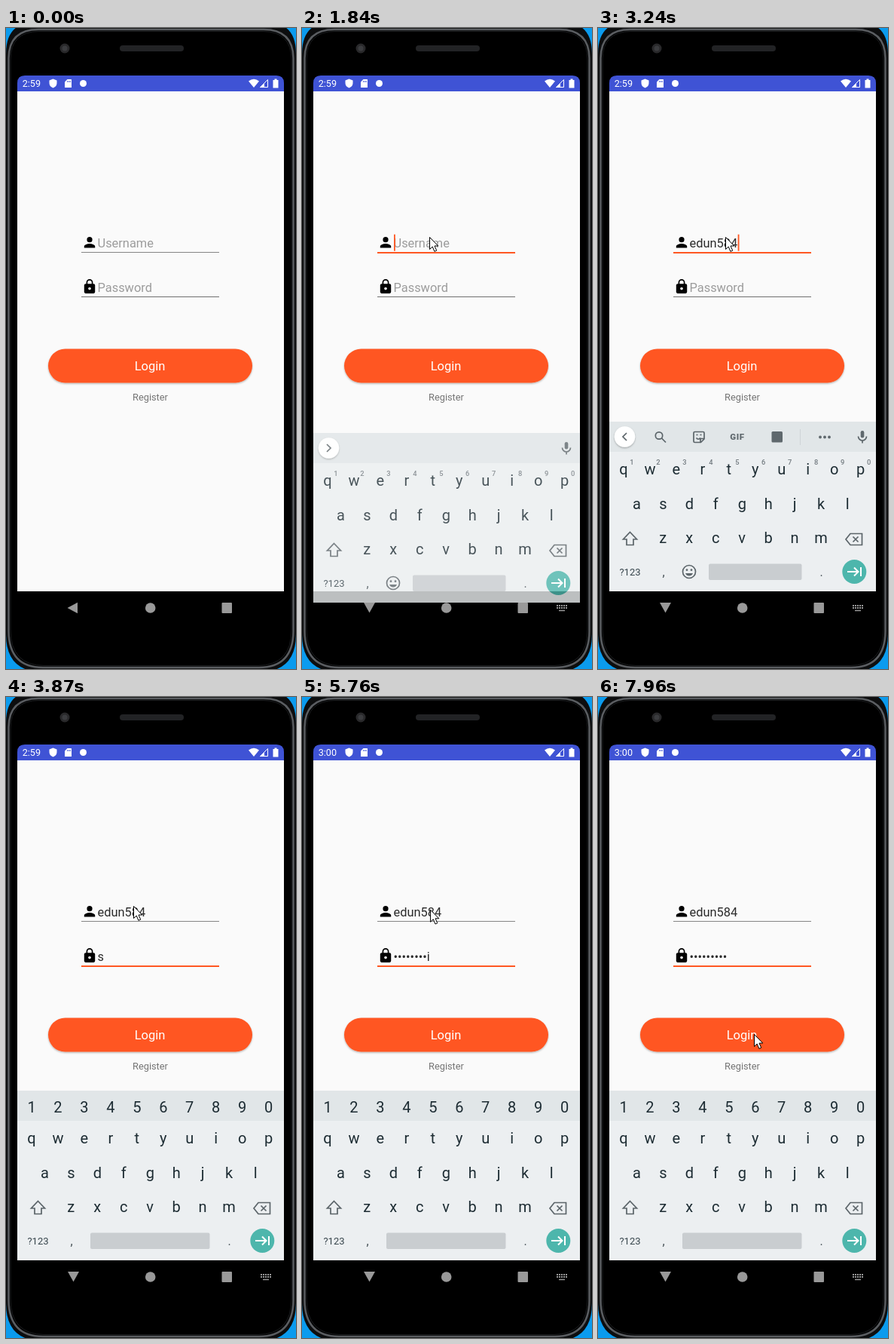
Animation, 385 px wide and 850 px high, one loop 8000 ms. Source, as an HTML page:

```html
<!DOCTYPE html>
<html lang="en">
<head>
<meta charset="utf-8">
<title>Login screen</title>
<style>
  html, body { margin: 0; width: 100%; height: 100%; overflow: hidden; background: #0b9bee; }
  svg { display: block; width: 385px; height: 850px; font-family: Roboto, "Noto Sans", sans-serif; }
  text { white-space: pre; }
  .mid { text-anchor: middle; }
  .field { font-size: 16.4px; }
  .key { font-size: 20px; fill: #1d2c33; text-anchor: middle; }
  .sup { font-size: 9.3px; font-weight: 500; fill: #737b80; text-anchor: middle; }
  .stop { font-size: 16px; fill: #465156; text-anchor: middle; }
  .word { font-size: 16.5px; fill: #636b70; text-anchor: middle; }
  .line { fill: none; stroke: #5b6469; stroke-width: 1.7; }
  .tool { fill: #5f686d; }
</style>
</head>
<body>
<svg viewBox="0 0 385 850">
  <defs>
    <filter id="shadow" x="-10%" y="-20%" width="120%" height="150%">
      <feDropShadow dx="0" dy="1.2" stdDeviation="1.2" flood-opacity=".3"/>
    </filter>
  </defs>

  <!-- phone -->
  <rect width="385" height="850" fill="#0b9bee"/>
  <path d="M0 34Q0 -8 40 -8H345Q385 -8 385 34V804Q385 854 336 854H49Q0 854 0 804Z" fill="#0d0e0f"/>
  <path d="M3.500 40Q4 2 43 2H342Q381 2 381.500 40V800Q381 848 336 848H49Q4 848 3.500 800Z" fill="#000" stroke="#5a5d61" stroke-width="2.500"/>
  <path d="M6 42Q6 4.500 44 4.500H341Q379 4.500 379 42V798Q379 845.500 334 845.500H51Q6 845.500 6 798Z" fill="#000" stroke="#1c1e20"/>
  <circle cx="78" cy="27" r="6.500" fill="#29292b"/><circle cx="78" cy="27" r="3.500" fill="#3b3c3f"/>
  <rect x="151" y="23" width="85" height="8" rx="4" fill="#222325"/>

  <!-- screen -->
  <rect x="15" y="84" width="354" height="663" fill="#fafafa"/>
  <path d="M15 84V73Q15 63 25 63H359Q369 63 369 73V84Z" fill="#3f53d5"/>
  <g fill="#fff">
    <text id="clock" x="21.700" y="78.300" font-size="12.600"></text>
    <path d="M62.500 67.500L67.500 69.500V73Q67.500 77.500 62.500 79.500Q57.500 77.500 57.500 73V69.500Z"/>
    <path d="M81.500 68H86.500Q87 68 87 68.500V79H78V71.500Z"/>
    <path d="M81.500 70V72M83.500 70V72M85.300 70V72" stroke="#3f53d5" stroke-width=".9"/>
    <circle cx="102.500" cy="73.500" r="4.500"/>
    <path d="M322 70.500Q329 65 336 70.500L329 79Z"/>
    <path d="M347.500 68.500V78.500H337.500Z" fill="none" stroke="#fff"/><path d="M343 73.500V79H337Z"/>
    <path d="M356.500 67.500H359.500V69H361.500V79.500H354.500V69H356.500Z"/>
  </g>

  <!-- form -->
  <g transform="translate(100.200 273.500) scale(.9)">
    <circle cx="12" cy="8" r="4"/>
    <path d="M12 14C9.330 14 4 15.340 4 18V20H20V18C20 15.340 14.670 14 12 14Z"/>
  </g>
  <g transform="translate(100.200 332.100) scale(.9)">
    <rect x="4" y="8" width="16" height="14" rx="2"/>
    <path d="M8 9V6A4 4 0 0 1 16 6V9" fill="none" stroke="#000" stroke-width="1.900"/>
    <circle cx="12" cy="15" r="2" fill="#fafafa"/>
  </g>
  <rect id="userLine" x="100" width="183"/>
  <rect id="passLine" x="100" width="183"/>
  <text id="user" class="field" x="121.500" y="291"></text>
  <text id="pass" class="field" x="121.500" y="349.500"></text>
  <rect id="mark" x="122" y="293" width="9" height="1" fill="#333"/>
  <rect id="caret" width="1.800" height="22" fill="#ff5722"/>
  <rect x="56" y="425.500" width="271" height="45" rx="22.500" fill="#ff5722" filter="url(#shadow)"/>
  <text class="mid" x="191" y="454" font-size="16.500" fill="#fff">Login</text>
  <text class="mid" x="191.500" y="493.500" font-size="12.800" fill="#757575">Register</text>

  <!-- navigation -->
  <g fill="#999">
    <path id="back" d="M81.500 769L95 761.800V776.200Z"/>
    <path id="down" d="M82 762H97L89.500 775.500Z"/>
    <circle cx="191.700" cy="769" r="6.800"/>
    <rect x="286.500" y="762" width="13.500" height="14" rx="1"/>
    <g id="switcher">
      <path d="M338 766H352M338 769H352" stroke="#999" stroke-width="2" stroke-dasharray="2 1"/>
      <path d="M341 772.500H349" stroke="#999" stroke-width="1.500"/>
    </g>
  </g>

  <!-- keyboard -->
  <g id="board">
    <rect x="15" y="522" width="354" height="225" fill="#eceff1"/>
    <rect x="15" y="522" width="354" height="40" fill="#e1e6e8"/>
    <g id="strip">
      <circle cx="35.500" cy="542" r="13.700" fill="#fff" filter="url(#shadow)"/>
      <path id="chevron" class="line"/>
      <rect x="348.700" y="534" width="4.600" height="9.500" rx="2.300" class="tool"/>
      <path class="line" d="M345.500 541.500A5.500 5.500 0 0 0 356.500 541.500M351 547V550.500"/>
    </g>
    <g id="tools">
      <circle class="line" cx="81" cy="540.500" r="4.700"/><path class="line" d="M84.500 544L90 549.500"/>
      <path class="line" d="M128.500 535.500H139.500Q141 535.500 141 537V545L136.500 549.500H128.500Q127 549.500 127 548V537Q127 535.500 128.500 535.500M141 544.500H136V549.500M130.500 543.500Q133 547 136 543.500"/>
      <path class="line" d="M130.500 539.500H132.500M135.500 539.500H137.500"/>
      <text class="mid tool" x="185" y="546.300" font-size="11.500" font-weight="900" letter-spacing=".6">GIF</text>
      <rect x="230.500" y="535" width="14.500" height="14.500" rx="1.500" class="tool"/>
      <path d="M268.500 532V553" stroke="#cfd4d7"/>
      <g class="tool"><circle cx="295" cy="542.500" r="1.900"/><circle cx="301" cy="542.500" r="1.900"/><circle cx="307" cy="542.500" r="1.900"/></g>
    </g>
    <g id="words">
      <path d="M139.500 532V553M242.500 532V553" stroke="#cbd0d3"/>
      <text class="word" x="94" y="548.500"></text>
      <text class="word" x="190.500" y="548.500"></text>
      <text class="word" x="287" y="548.500"></text>
    </g>
    <g id="digits"></g>
    <g id="sups"></g>
    <g id="keys"></g>
    <path class="line" d="M42.500 668.500L51.500 678H47V685.500H38V678H33.500Z"/>
    <path class="line" d="M335 670.500H350.500V685.500H335L329 678ZM338.500 674.500L345.500 681.500M345.500 674.500L338.500 681.500"/>
    <text class="mid" x="42.500" y="726" font-size="13" fill="#37454c">?123</text>
    <text class="stop" x="87" y="727">,</text>
    <text class="stop" x="296.500" y="727">.</text>
    <g id="smile">
      <circle class="line" cx="121" cy="721" r="8.500"/>
      <path class="tool" d="M116 723H126Q124.500 726.500 121 726.500T116 723Z"/>
      <circle cx="118" cy="718.700" r="1.400" class="tool"/><circle cx="124" cy="718.700" r="1.400" class="tool"/>
    </g>
    <rect id="space" y="710.500" height="21.500" rx="2" fill="#c9cdd0"/>
    <circle cx="340.300" cy="721" r="16" fill="#4db6ac"/>
    <path d="M331 721H345M340 715.500L345.500 721L340 726.500M349 715V727" fill="none" stroke="#fff" stroke-width="2"/>
  </g>

  <!-- pointer -->
  <g id="mouse">
    <path d="M.5 .5V16.500L4.200 13L6.900 19.300L9.700 18.100L7 12H11.800Z" fill="#fff" stroke="#000"/>
    <circle id="ring" r="15" fill="#fff200" fill-opacity=".5"/>
  </g>
</svg>
<script>
const LOOP = 8000, NAME = "edun584", ACCENT = "#ff5722";
const $ = id => document.getElementById(id);
const show = (id, on) => $(id).setAttribute("visibility", on ? "visible" : "hidden");
const set = (id, attrs) => { for (const k in attrs) $(id).setAttribute(k, attrs[k]); };
const within = (t, a, b) => t >= a && t < b;

// Value of the latest step reached at time t; steps are [time, value].
const at = (t, steps) => steps.reduce((v, s) => t >= s[0] ? s[1] : v, steps[0][1]);

const typed = [[0, 0], [2400, 1], [2630, 2], [2700, 3], [2770, 4], [3050, 5], [3120, 6], [3240, 7]];
const secret = [[0, ""], [3870, "s"], [4110, "•o"], [4260, "•••r"], [4490, "••••g"], [4660, "•••••h"],
  [4810, "••••••l"], [4990, "•••••••n"], [5060, "••••••••i"], [6540, "•••••••••"]];
const guesses = [[0, "e|I|email"], [2630, "ed|edit|editing"], [2700, "edu|education|educate"], [2770, "edun|edun|educate"]];
const modes = [[0, "empty"], [1990, "tools"], [2400, "words"], [3050, "tools"], [3640, "digits"]];
const rise = [[0, [26, .35]], [1840, [15, .8]], [1940, [3, .96]], [1990, [0, 1]]];
const blink = [[0, 0], [1760, 1], [5520, 0], [6020, 1], [6540, 0], [7080, 1], [7960, 0]];

function row(id, chars, x, y, cls = "key") {
  [...chars].forEach((c, i) => {
    const el = document.createElementNS("http://www.w3.org/2000/svg", "text");
    el.setAttribute("class", cls);
    el.setAttribute("x", x + i * 34.95);
    el.setAttribute("y", y);
    el.textContent = c;
    $(id).append(el);
  });
}
row("digits", "1234567890", 34, 551);
row("keys", "qwertyuiop", 34, 592);
row("keys", "asdfghjkl", 51.5, 637.5);
row("keys", "zxcvbnm", 86.3, 683);
row("sups", "1234567890", 45, 578.5, "sup");

function pointer(t) {
  if (t < 5690) {
    const p = Math.min(1, (Math.floor((t - 300) / 77) + .2) / 7);
    const e = 1 - (1 - p) ** 2;
    return [282 - 113 * e, 727 - 450 * e];
  }
  const p = Math.min(1, (Math.floor((t - 5690) / 77.7) + 1) / 10);
  const e = p * p * (3 - 2 * p);
  return [169 + 38 * e, 277 + 170 * e];
}

function field(id, value, hint) {
  const el = $(id), text = value || hint;
  if (el.textContent !== text) el.textContent = text;
  el.setAttribute("fill", value ? "#2b2b2b" : "#9c9c9c");
  return 122 + (value ? el.getComputedTextLength() : 0);
}

function underline(id, y, focus, idle) {
  set(id, { y, height: focus ? 2 : 1, fill: focus ? ACCENT : idle });
}

function draw(t) {
  const count = at(t, typed), inPass = t >= 3470, open = t >= 1760, mode = at(t, modes);
  $("clock").textContent = t < 4260 ? "2:59" : "3:00";

  const userEnd = field("user", NAME.slice(0, count), "Username");
  const passEnd = field("pass", at(t, secret), "Password");
  underline("userLine", 297, t >= 1390 && !inPass, "#858585");
  underline("passLine", 356, inPass, "#707070");
  show("mark", count > 0 && count < 5);
  set("mark", { width: userEnd - 122 });
  show("caret", at(t, blink) && !within(t, 3870, 3960));
  set("caret", { x: inPass ? passEnd : userEnd, y: inPass ? 332.3 : 273.7 });

  show("back", !open);
  show("down", open);
  show("switcher", open);

  const [dy, alpha] = at(t, rise);
  $("board").style.display = open ? "" : "none";
  set("board", { transform: `translate(0 ${dy})`, opacity: alpha });
  const digits = mode === "digits", tools = mode === "tools";
  for (const id of ["tools", "words", "digits"]) $(id).style.display = id === mode ? "" : "none";
  for (const id of ["strip", "sups", "smile"]) $(id).style.display = digits ? "none" : "";
  set("chevron", { d: tools ? "M38 537L33 542L38 547" : "M33 537L38 542L33 547" });
  set("space", { x: digits ? 112 : 147, width: digits ? 158.5 : 123.5 });
  const guess = at(t, guesses).split("|");
  document.querySelectorAll(".word").forEach((el, i) => el.textContent = guess[i]);

  const [x, y] = pointer(t);
  $("mouse").style.display = t < 300 ? "none" : "";
  set("mouse", { transform: `translate(${x} ${y})` });
  $("ring").style.display = within(t, 1240, 1470) || within(t, 6540, 6700) ? "" : "none";
}

const start = performance.now();
function tick() {
  draw((performance.now() - start) % LOOP);
  requestAnimationFrame(tick);
}
tick();
</script>
</body>
</html>
```
